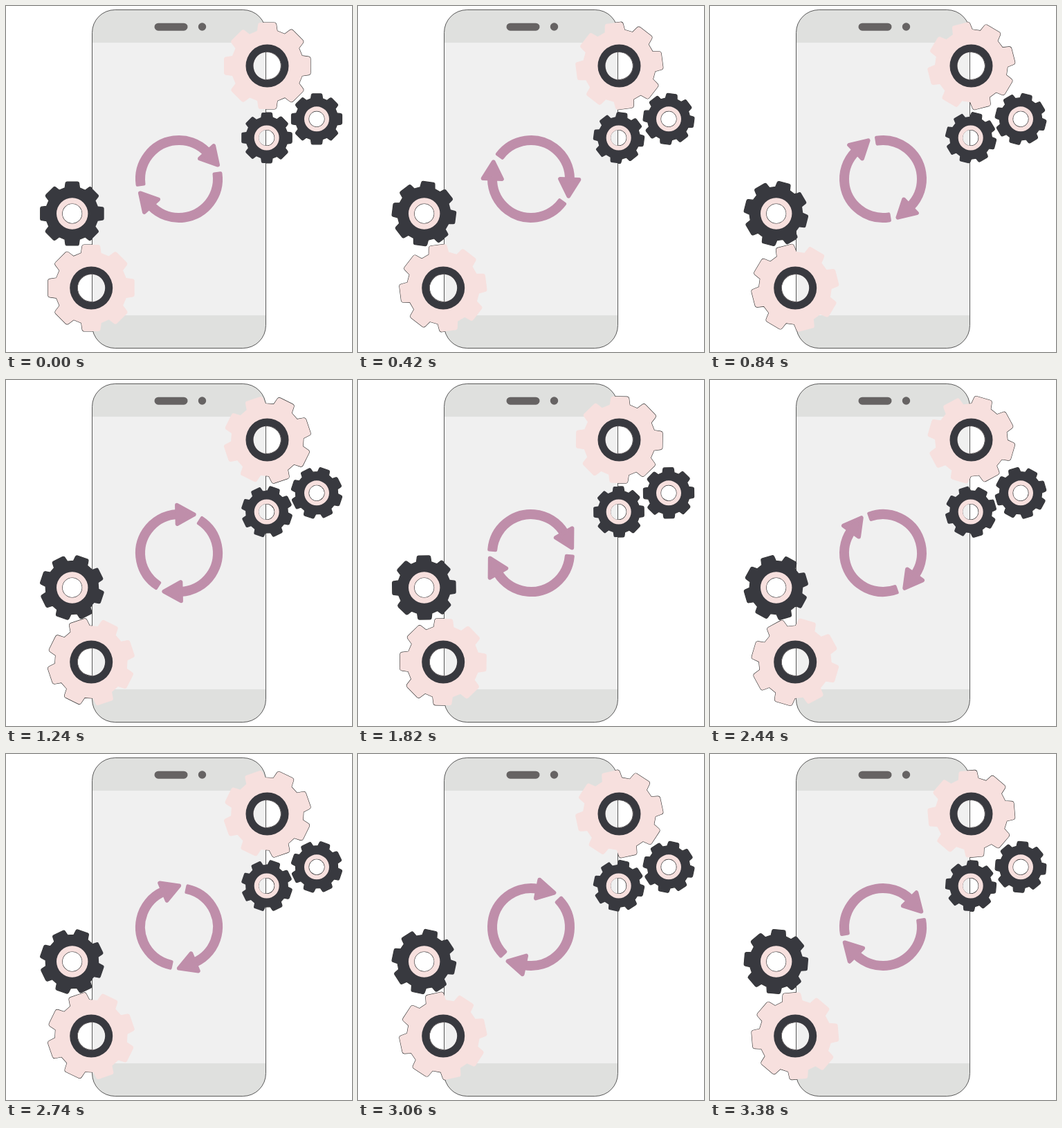
Animation, 500 px wide and 500 px high, one loop 3.4 s. Source, as an HTML page with a canvas:

```html
<!DOCTYPE html>
<html lang="en">
<head>
<meta charset="utf-8">
<title>Phone sync</title>
<style>
  html, body { margin: 0; width: 100%; height: 100%; overflow: hidden; background: #fff; }
  canvas { display: block; width: 500px; height: 500px; }
</style>
</head>
<body>
<canvas id="stage" width="500" height="500"></canvas>
<script>
const ctx = document.getElementById('stage').getContext('2d');
const LOOP = 3400;
const TAU = Math.PI * 2;
const RAD = Math.PI / 180;
const DARK = '#38393f';
const BLUSH = '#f7e0de';
const MAUVE = '#bf8eaa';
const EDGE = '#333';

const gears = [
  { x: 377.5, y: 86.5, r: 62.5, ring: 31, hole: 20, body: BLUSH, hub: DARK, dir: -1 },
  { x: 123.2, y: 407.5, r: 62.5, ring: 31, hole: 20, body: BLUSH, hub: DARK, dir: -1 },
  { x: 95.7, y: 300, r: 46, ring: 22.7, hole: 14.5, body: DARK, hub: BLUSH, dir: 1 },
  { x: 376.7, y: 190.5, r: 36.5, ring: 18, hole: 11.5, body: DARK, hub: BLUSH, dir: 1 },
  { x: 449, y: 163.3, r: 36.5, ring: 18, hole: 11.5, body: DARK, hub: BLUSH, dir: 1 }
];

const phone = new Path2D();
phone.roundRect(124.5, 5.5, 251, 489, 33);

const outsidePhone = new Path2D();
outsidePhone.rect(0, 0, 500, 500);
outsidePhone.addPath(phone);

function fillRect(color, x, y, w, h) {
  ctx.fillStyle = color;
  ctx.fillRect(x, y, w, h);
}

function drawPhone() {
  ctx.save();
  ctx.clip(phone);
  fillRect('#dfe0de', 124, 5, 252, 490);
  fillRect('#f0f0f0', 124, 53, 252, 394);
  ctx.restore();
  ctx.strokeStyle = EDGE;
  ctx.lineWidth = 0.8;
  ctx.stroke(phone);

  ctx.fillStyle = '#666363';
  ctx.beginPath();
  ctx.roundRect(214.5, 24.7, 48, 11, 5.5);
  ctx.arc(283.5, 30, 5.7, 0, TAU);
  ctx.fill();
}

function circle(r) {
  ctx.moveTo(r, 0);
  ctx.arc(0, 0, r, 0, TAU);
}

function toothedPath(r) {
  const base = 0.232 * r, tip = 0.205 * r, root = 0.807 * r, round = 0.055 * r;
  for (let i = 0; i < 8; i++) {
    ctx.lineTo(-base, -root);
    ctx.arcTo(-tip, -r, tip, -r, round);
    ctx.arcTo(tip, -r, base, -root, round);
    ctx.lineTo(base, -root);
    ctx.rotate(TAU / 8);
  }
  ctx.closePath();
}

function drawGear(gear, turn) {
  ctx.save();
  ctx.clip(outsidePhone, 'evenodd');
  traceGear(gear, turn);
  ctx.strokeStyle = EDGE;
  ctx.lineWidth = 1.2;
  ctx.stroke();
  ctx.restore();

  traceGear(gear, turn);
  ctx.fillStyle = gear.body;
  ctx.fill('evenodd');

  ctx.save();
  ctx.translate(gear.x, gear.y);
  ctx.beginPath();
  circle(gear.ring);
  circle(gear.hole);
  ctx.fillStyle = gear.hub;
  ctx.fill('evenodd');
  ctx.restore();
}

function traceGear(gear, turn) {
  ctx.save();
  ctx.translate(gear.x, gear.y);
  ctx.rotate(turn * gear.dir * RAD);
  ctx.beginPath();
  toothedPath(gear.r);
  circle(gear.hole);
  ctx.restore();
}

function drawArrow() {
  const tail = 172 * RAD, neck = 316 * RAD;
  ctx.fillStyle = ctx.strokeStyle = MAUVE;
  ctx.lineJoin = 'round';

  // The stroke around each fill rounds its corners.
  ctx.lineWidth = 5;
  ctx.beginPath();
  ctx.arc(0, 0, 60.5, tail, neck);
  ctx.arc(0, 0, 51.5, neck, tail, true);
  ctx.closePath();
  ctx.fill();
  ctx.stroke();

  ctx.lineWidth = 6;
  ctx.beginPath();
  ctx.moveTo(50, -48);
  ctx.lineTo(56, -20.5);
  ctx.lineTo(30, -29.6);
  ctx.closePath();
  ctx.fill();
  ctx.stroke();
}

function drawSync(turn) {
  ctx.save();
  ctx.translate(250, 250);
  ctx.rotate(turn * RAD);
  drawArrow();
  ctx.rotate(Math.PI);
  drawArrow();
  ctx.restore();
}

const start = performance.now();

function frame() {
  const p = ((performance.now() - start) % LOOP) / LOOP;
  const gearTurn = 412 * p + 3.5 * Math.sin(Math.PI * p);
  fillRect('#fff', 0, 0, 500, 500);
  drawPhone();
  drawSync(360 * p);
  for (const gear of gears) drawGear(gear, gearTurn);
  requestAnimationFrame(frame);
}
frame();
</script>
</body>
</html>
```
